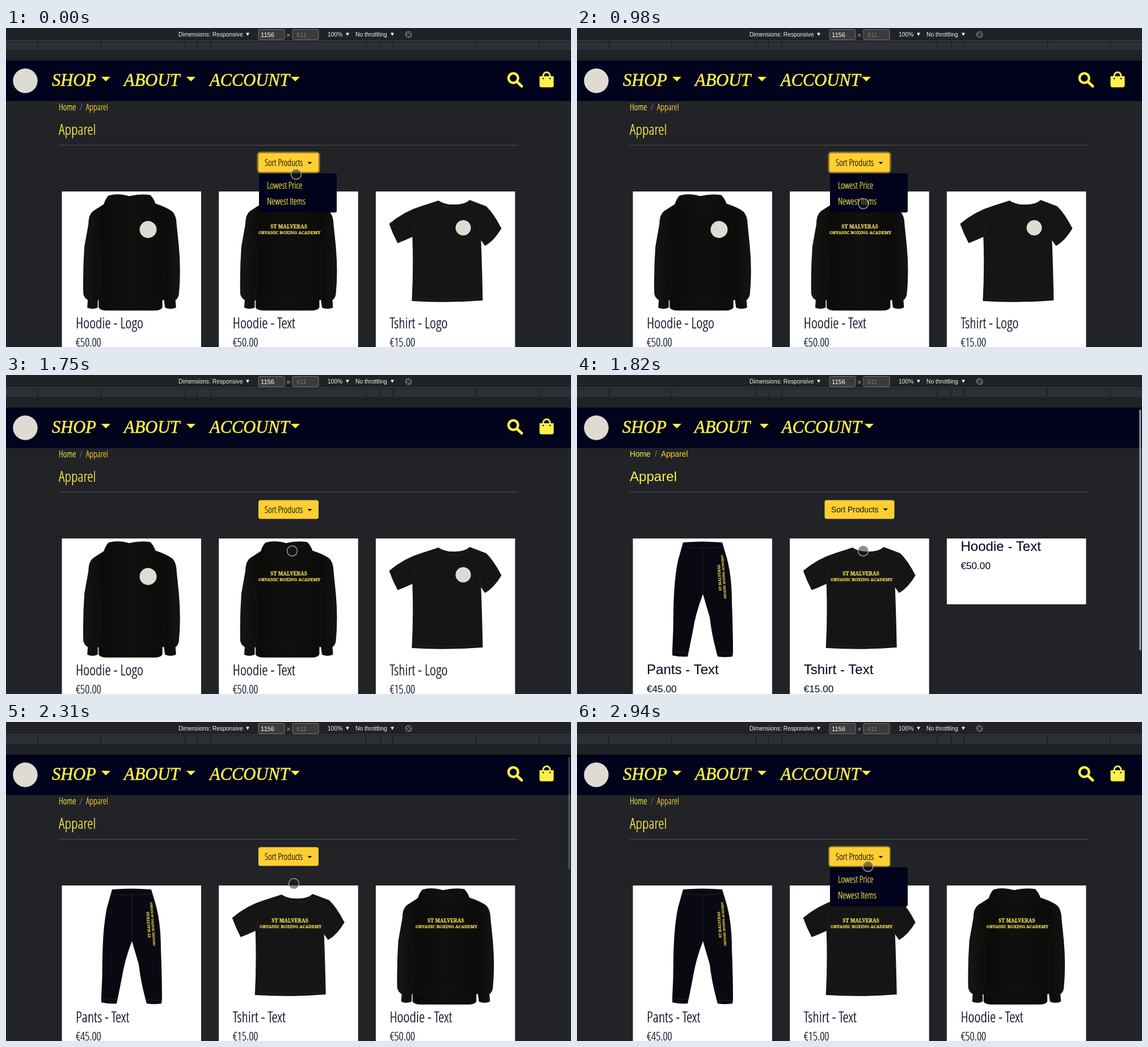
These frames come from a looping animation (996x562 px, 3010 ms). An HTML page:

```html
<!DOCTYPE html>
<html lang="en">
<head>
<meta charset="utf-8">
<title>Apparel shop</title>
<style>
html, body { margin: 0; width: 100%; height: 100%; overflow: hidden; background: #212327; }
svg { display: block; width: 100vw; height: 100vh; }
text { white-space: pre; }
.sans { font-family: "Liberation Sans", Arial, sans-serif; }
.nav { font-family: "Liberation Serif", serif; font-style: italic; stroke: #fff04a; stroke-width: .6; }
.print { font-family: "Noto Serif", serif; font-weight: 800; text-anchor: middle; stroke: #e3d450; stroke-width: .3; }
</style>
</head>
<body>
<svg id="stage" viewBox="0 0 996 562"></svg>
<script>
const LOOP = 3010, STEP = 70;
const YELLOW = '#fff04a', GOLD = '#ffcf32', NAVY = '#00031b', PITCH = 276.7;
const NARROW = '"Open Sans Condensed Light", "Noto Sans ExtraCondensed", "Open Sans Condensed", "Roboto Condensed", "Noto Sans", sans-serif';

// One size factor for the condensed face, whichever of the list is present
const pen = document.createElement('canvas').getContext('2d');
pen.font = `300 extra-condensed 26px ${NARROW}`;
const narrowScale = Math.min(1.05, 119 / pen.measureText('Hoodie - Logo').width);

const rect = (x, y, w, h, fill, more = '') =>
  `<rect x="${x}" y="${y}" width="${w}" height="${h}" fill="${fill}" ${more}/>`;
const path = (d, fill, more = '') => `<path d="${d}" fill="${fill}" ${more}/>`;
const disc = (x, y, r) => `<circle cx="${x}" cy="${y}" r="${r}" fill="#dedbd3"/>`;
const text = (x, y, s, size, fill, cls = 'sans') =>
  `<text x="${x}" y="${y}" font-size="${size}" fill="${fill}" class="${cls}">${s}</text>`;
const narrow = (x, y, s, size, fill) =>
  `<text x="${x}" y="${y}" fill="${fill}" stroke="${fill}" stroke-width=".25"
    style='font:300 extra-condensed ${size * narrowScale}px ${NARROW}'>${s}</text>`;
const arrow = (x, y, w, h, fill) => path(`M${x} ${y}h${w}l${-w / 2} ${h}z`, fill);

const print = (x, y, more = '') => `<g transform="translate(${x} ${y}) ${more}">
  ${text(-1, -5, 'ST MALVERAS', 9, '#e3d450', 'print')}
  ${text(0, 5, 'ORVANIC BOXING ACADEMY', 7.5, '#e3d450', 'print')}</g>`;

// Garments, drawn in the space of the first card
const hoodie = path(`M181 296Q197 291 217 297Q238 292 254 295Q260 301 263 310
  Q284 317 293 324Q300 332 300 346L304 385Q308 430 304 469Q303 476 298 479L299 492
  Q290 496 281 492L279 478L275 479V492Q272 497 262 497H178Q166 497 164 492V479
  L161 479V492Q152 496 144 492L145 479Q138 475 137 468Q136 425 139 385L146 346
  Q146 329 154 323L173 311Q176 301 181 296Z`, 'url(#cloth)', 'stroke="#11100e" stroke-width="1.500"') +
  path(`M176 309Q217 330 264 310M183 300Q217 311 252 299M162 370Q169 420 163 478M281 370
  Q274 425 279 478M165 479Q220 470 275 479`, 'none', 'stroke="#25231f" opacity=".55"');
const shirt = path(`M209 304Q221 312 238 311Q255 311 264 303L293 314Q306 326 320 353
  Q307 375 291 384L284 374Q286 425 287 480Q225 485 162 481Q165 425 163 368
  Q150 374 137 379Q128 362 122 345Q148 323 178 314Z`, '#151516') +
  path(`M208 306Q221 319 239 318Q256 317 265 305M164 366Q169 350 167 335M283 374
  Q280 360 283 340M162 476Q225 481 287 475`, 'none', 'stroke="#2a2a2c" opacity=".7"');
const pants = path(`M187 295Q220 292 256 295L262 315Q273 350 273 400Q275 450 275 489
  L274 496Q261 498 248 496L246 489Q237 455 234 427L222 386Q209 420 204 452L197 487
  L195 496Q181 497 168 494V486Q170 450 170 415Q171 360 178 327Z`, '#090912') +
  path('M186 303Q220 306 258 303M222 306V385M168 487L196 489M247 490H275', 'none', 'stroke="#22222c"');

const items = {
  hoodieLogo: ['Hoodie - Logo', '€50.00', hoodie + disc(250.5, 355, 15)],
  hoodieText: ['Hoodie - Text', '€50.00', hoodie + print(223, 358)],
  shirtLogo: ['Tshirt - Logo', '€15.00', shirt + disc(252.6, 352, 13.5)],
  shirtText: ['Tshirt - Text', '€15.00', shirt + print(225, 358)],
  pantsText: ['Pants - Text', '€45.00', pants + print(257, 356, 'rotate(-94) scale(.71)')],
};

function card(key, i, plain) {
  const [name, price, art] = items[key];
  const bare = plain && i === 2;          // picture not loaded yet
  const put = plain ? text : narrow;
  const top = bare ? 310 : plain ? 526.5 : 528.5;
  return `<g transform="translate(${i * PITCH} 0)">
    ${rect(98.5, 288, 245.5, bare ? 116 : 280, '#fff')}${bare ? '' : art}
    ${put(123, top, name, plain ? 24.1 : 26, NAVY)}
    ${put(123, top + 32.3, price, plain ? 17.2 : 20, NAVY)}</g>`;
}

function page(id, keys, plain) {
  const put = plain ? text : narrow, up = plain ? 1 : 0;
  const size = plain ? 13.79 : 15.5;
  const menu = plain
    ? [['SHOP', 80, 168], ['ABOUT', 207, 322], ['ACCOUNT', 361, 507]]
    : [['SHOP', 81, 168], ['ABOUT', 208, 318], ['ACCOUNT', 359, 502]];
  const icons = `<g fill="none" stroke="${YELLOW}">
    <circle cx="894.3" cy="88.3" r="8.4" stroke-width="4.4"/>
    <path d="M901 95L909 102.5" stroke-width="5" stroke-linecap="round"/>
    <path d="M947 87V84a6 6 0 0 1 12 0V87" stroke-width="3"/></g>
    ${path('M940.5 85H965.500V101Q965.500 104.500 962 104.500H944Q940.500 104.500 940.500 101Z', YELLOW)}
    <g fill="${NAVY}"><circle cx="947" cy="89" r="1.3"/><circle cx="959" cy="89" r="1.3"/></g>`;
  return `<g id="${id}">
    ${menu.map(([s, x, a]) => text(x, 101.5, s, 30.5, YELLOW, 'nav') + arrow(a, 86, 16, 8, YELLOW)).join('')}
    ${plain ? '' : icons}
    ${put(93, 145 - up, 'Home', size, YELLOW)}
    ${put(plain ? 137 : 129.5, 145 - up, '/', size, '#6c757d')}
    ${put(plain ? 148 : 141, 145 - up, 'Apparel', size, GOLD)}
    ${put(93, 187.5 - up, 'Apparel', plain ? 24.1 : 26, YELLOW)}
    ${keys.map((k, i) => card(k, i, plain)).join('')}
    ${plain ? rect(436.5, 220.5, 123, 33, GOLD, 'rx="3.500"') : rect(445, 220.5, 106, 33, GOLD, 'rx="3.500"')}
    ${put(plain ? 448 : 456, 242.5 - up, 'Sort Products', size, '#111')}
    ${plain ? arrow(539.5, 235, 8.6, 4.3, '#111') : arrow(531.5, 236, 8, 4, '#111')}</g>`;
}

const ticks = [56, 167, 316, 337, 361, 635, 660, 682, 829, 940];
const toolbar = rect(0, 0, 996, 58, '#212225') + rect(0, 22, 996, 1, '#46484b') +
  rect(0, 25, 996, 13.5, '#2c3138') + ticks.map(x => rect(x - .5, 25, 1.2, 13.5, '#17191c')).join('') +
  text(304, 15, 'Dimensions: Responsive', 10.34, '#f1f1f1') +
  text(567, 15, '100%', 10.34, '#f1f1f1') + text(616, 15, 'No throttling', 10.34, '#f1f1f1') +
  [423, 599, 678].map(x => arrow(x, 8.5, 6, 5.5, '#f1f1f1')).join('') +
  [445, 505].map(x => rect(x, 2.5, 46, 18, '#3b3b3c', 'rx="2" stroke="#777"')).join('') +
  text(449, 15.5, '1156', 11.2, '#fff') + text(512, 15.5, '611', 11.2, '#777') +
  text(494, 16.5, '×', 13, '#aaa') +
  `<g fill="none" stroke="#8b8d90" transform="translate(709.7 11.5) rotate(-45)">
    <circle r="5.300"/><rect x="-2.200" y="-5" width="4.400" height="10" rx="1"/></g>`;

document.getElementById('stage').innerHTML = `
  <defs><linearGradient id="cloth">
    <stop stop-color="#171613"/><stop offset=".2" stop-color="#0b0b0a"/>
    <stop offset=".5" stop-color="#11100e"/><stop offset=".85" stop-color="#0b0b0a"/>
    <stop offset="1" stop-color="#161512"/></linearGradient></defs>
  ${rect(0, 0, 996, 562, '#212327')}${toolbar}
  ${rect(0, 57.5, 996, 71.2, NAVY)}${disc(34, 93, 21.7)}
  ${rect(93.5, 206, 809, 1, '#505255')}
  <rect id="glow" x="445" y="220.5" width="106" height="33" rx="3.500" fill="none" stroke="#8a7328"/>
  ${page('first', ['hoodieLogo', 'hoodieText', 'shirtLogo'])}
  ${page('loading', ['pantsText', 'shirtText', 'hoodieText'], true)}
  ${page('sorted', ['pantsText', 'shirtText', 'hoodieText'])}
  <g id="menu">${rect(446, 256, 137, 69, NAVY, 'rx="3"')}
    ${narrow(460, 283, 'Lowest Price', 15.5, YELLOW)}${narrow(460, 310.5, 'Newest Items', 15.5, YELLOW)}</g>
  <rect id="bar" x="991.3" y="61" width="3" rx="1.500" fill="#a3a4a6"/>
  <circle id="cursor" r="9" fill="rgba(25,25,25,.5)" stroke="rgba(190,190,185,.8)" stroke-width="1.500"/>`;

const el = id => document.getElementById(id);
const show = (id, on) => el(id).setAttribute('display', on ? 'inline' : 'none');
const ramp = (t, a, b) => Math.max(0, Math.min(1, (t - a) / (b - a)));

// time, x, y
const route = [
  [0, 511.5, 257.5], [490, 508, 283], [700, 508, 283], [980, 504.5, 309.5],
  [2100, 504.5, 310], [2590, 512, 246], [2730, 512.5, 246], [2940, 513, 254.5], [LOOP, 511.5, 257.5],
];
function cursorAt(t) {
  const i = route.findIndex(p => p[0] > t);
  const [a, b] = [route[i - 1], route[i]];
  const u = ramp(t, a[0], b[0]), e = u * u * (3 - 2 * u);
  return [1, 2].map(n => a[n] + (b[n] - a[n]) * e);
}

function draw(now) {
  const t = Math.floor(now % LOOP / STEP) * STEP;
  show('first', t < 1820);
  show('loading', t >= 1820 && t < 1890);
  show('sorted', t >= 1890);
  show('menu', t < 1190 || t >= 2800);

  const glow = t < 2000 ? 1 - ramp(t, 1120, 1330) : ramp(t, 2730, 3010);
  show('glow', glow > 0);
  el('glow').setAttribute('stroke-width', 5.4 * glow);

  show('bar', t >= 1820 && t < 2450);
  el('bar').setAttribute('height', t < 1890 ? 424 : 198);
  el('bar').setAttribute('opacity', 1 - ramp(t, 2100, 2450));

  const [x, y] = cursorAt(t);
  el('cursor').setAttribute('cx', x);
  el('cursor').setAttribute('cy', y);
  requestAnimationFrame(draw);
}
requestAnimationFrame(draw);
</script>
</body>
</html>
```
